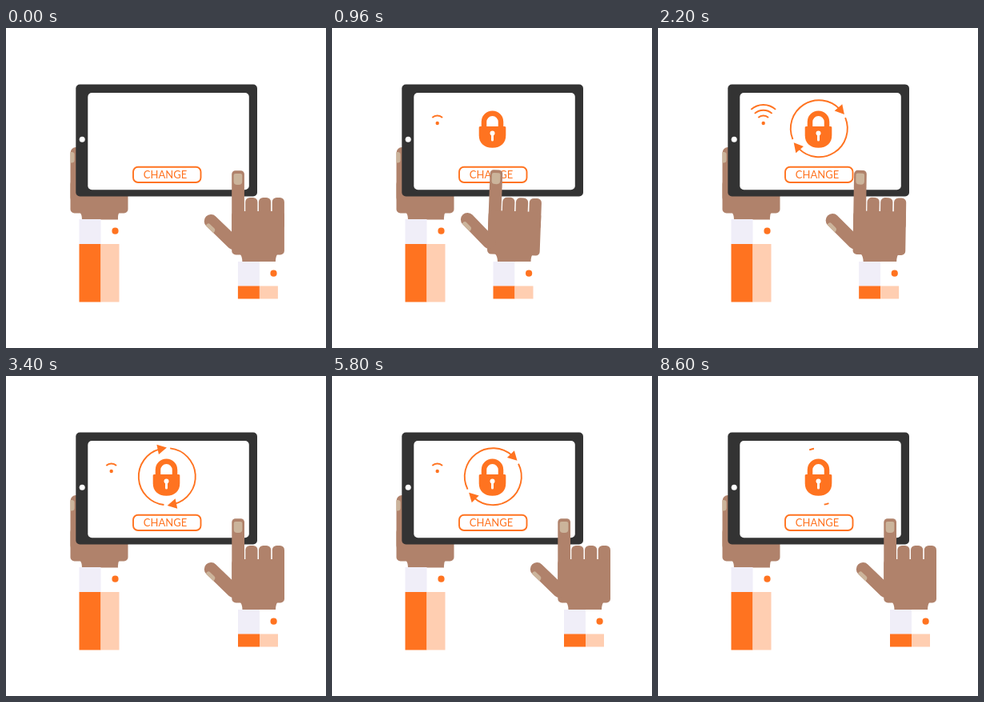
Recreate the animation shown at these times as an HTML page. Size 400 by 400 pixels, loop 8.64 s.

```html
<!DOCTYPE html>
<html lang="en">
<head>
<meta charset="utf-8">
<title>Change lock</title>
<style>
html, body { margin: 0; width: 100%; height: 100%; overflow: hidden; background: #fff; }
svg { display: block; width: 100%; height: 100%; }
.skin { fill: #b0826b; }
.nail { fill: #cbb49b; }
.orange { fill: #ff7320; }
.peach { fill: #ffceb1; }
.cuff { fill: #f0eef8; }
.line { fill: none; stroke: #ff7320; stroke-width: 1.9; }
text { font: 13px Lato, Inter, sans-serif; text-anchor: middle; }
</style>
</head>
<body>
<svg viewBox="0 0 400 400">
  <!-- holding hand -->
  <g class="skin">
    <rect x="80.5" y="149" width="30" height="70" rx="7"/>
    <rect x="80.5" y="190" width="72" height="41.5" rx="5"/>
    <path d="M92 230H142Q139.500 233 140 239.500H95Q95 233 92 230Z"/>
  </g>
  <path class="nail" d="M80.500 155H82Q85.500 155 85.500 158V165Q85.500 168.500 82 168.500H80.500Z"/>
  <rect class="cuff" x="91.500" y="239" width="27" height="31"/>
  <rect class="orange" x="91.500" y="270" width="27" height="72.500"/>
  <rect class="peach" x="118.500" y="270" width="23" height="72.500"/>
  <circle class="orange" cx="136.500" cy="253.700" r="4.100"/>

  <!-- tablet -->
  <rect x="87.300" y="70.500" width="226.700" height="140" rx="5" fill="#333"/>
  <rect x="102.300" y="81" width="201.500" height="121.300" rx="5" fill="#fff"/>
  <circle cx="95.200" cy="139.300" r="3.500" fill="#fff"/>
  <rect class="line" x="159" y="173.700" width="84.500" height="19.300" rx="6"/>
  <text class="orange" x="199" y="187.600">CHANGE</text>

  <g id="wifi"><circle class="orange" cx="131.700" cy="119" r="2.200"/></g>

  <g id="lock">
    <path class="line" style="stroke-width:6.500" d="M190 125V117.300a10.500 10.500 0 0 1 21 0V125"/>
    <path class="orange" d="M185 123H216Q217.300 123 217.300 124.500V134C217.300 144 211 149.700 200.500 149.700S183.700 144 183.700 134V124.500Q183.700 123 185 123Z"/>
    <circle cx="200.500" cy="131.500" r="3" fill="#fff"/>
    <rect x="199" y="132" width="3" height="9.500" rx="1.500" fill="#fff"/>
  </g>

  <g id="ring"></g>

  <!-- pointing hand -->
  <g id="hand">
    <g id="palm" class="skin">
      <rect x="282.300" y="178.300" width="15.700" height="90" rx="4.500"/>
      <rect x="299.300" y="212" width="15.200" height="40" rx="5.500"/>
      <rect x="316" y="212" width="15.200" height="40" rx="5.500"/>
      <rect x="332.800" y="212" width="15.200" height="40" rx="5.500"/>
      <rect x="282.300" y="229" width="65.700" height="54.500" rx="5"/>
      <g transform="translate(256.300 241.500) rotate(44)">
        <rect x="-8.500" y="-8.500" width="56" height="17" rx="8.500"/>
        <path class="nail" d="M-1 8.500Q-2 3.500 2 3.500H9Q12.500 3.500 12.500 8.500Z"/>
      </g>
      <path class="nail" d="M284.700 184Q284.700 182 287 182H293Q295.300 182 295.300 184V192Q295.300 196 291 196H289Q284.700 196 284.700 192Z"/>
    </g>
    <path class="skin" d="M292 282H340Q337 285 337 292.500H295.500Q295.500 285 292 282Z"/>
    <rect class="cuff" x="290" y="292" width="27" height="30.500"/>
    <rect x="317" y="292" width="23" height="30.500" fill="#fff"/>
    <rect class="orange" x="290" y="322.500" width="27" height="16"/>
    <rect class="peach" x="317" y="322.500" width="23" height="16"/>
    <circle class="orange" cx="334.600" cy="306.700" r="4.100"/>
  </g>
</svg>
<script>
const LOOP = 8640;
const $ = id => document.getElementById(id);
const wifi = $('wifi'), lock = $('lock'), ring = $('ring'), hand = $('hand'), palm = $('palm');

// Progress of t through a..b, clamped to 0..1
const ramp = (t, a, b) => Math.min(1, Math.max(0, (t - a) / (b - a)));
const within = (t, [a, b]) => t >= a && t < b;

// Point on a circle, angle in degrees clockwise from the top
const polar = (r, deg) => {
  const a = deg * Math.PI / 180;
  return `${r * Math.sin(a)} ${-r * Math.cos(a)}`;
};
const arc = (r, a, b) => `M${polar(r, a)}A${r} ${r} 0 0 1 ${polar(r, b)}`;

wifi.innerHTML += [9.5, 16.3, 23].map(r =>
  `<path class="line" transform="translate(131.700 119)" d="${arc(r, -42, 42)}"/>`).join('');

ring.innerHTML = [0, 180].map(turn => `<g transform="rotate(${turn})">
  <path class="line arc" pathLength="1" d="${arc(35.5, -162, -3)}"/>
  <g transform="translate(0 -35.500)"><path class="orange head" d="M-4.500 -6.300L7 0L-4.500 6.300Z"/></g>
</g>`).join('');
const arcs = ring.querySelectorAll('.arc'), heads = ring.querySelectorAll('.head');

// Visible spans of the dot and the three waves
const spans = [
  [[320, 4280], [5340, 8520]],
  [[640, 3680], [5640, 8400]],
  [[1320, 3080], [6060, 8240]],
  [[1920, 2480], [6500, 8080]]
];

function draw(t) {
  const reach = ramp(t, 0, 960) - ramp(t, 1640, 2640);
  hand.setAttribute('transform', `translate(${-88.5 * reach})`);
  palm.setAttribute('transform', `rotate(${2.1 * reach} 315 284)`);

  const pop = 1.2 * ramp(t, 400, 680) - 0.2 * ramp(t, 680, 840);
  lock.setAttribute('transform', `translate(200.5 126.3) scale(${pop}) translate(-200.5 -126.3)`);

  [...wifi.children].forEach((el, i) =>
    el.setAttribute('visibility', spans[i].some(s => within(t, s)) ? 'visible' : 'hidden'));

  const trim = ramp(t, 1000, 1640) - ramp(t, 8000, 8640);
  const size = ramp(t, 1440, 1640) - ramp(t, 8000, 8200);
  ring.setAttribute('transform', `translate(201.3 125.7) rotate(${(t - 1698) * 0.0988})`);
  arcs.forEach(el => el.setAttribute('stroke-dasharray', `${trim} 2`));
  heads.forEach(el => el.setAttribute('transform', `scale(${size})`));
}

const start = performance.now();
function tick() {
  draw((performance.now() - start) % LOOP);
  requestAnimationFrame(tick);
}
tick();
</script>
</body>
</html>
```
